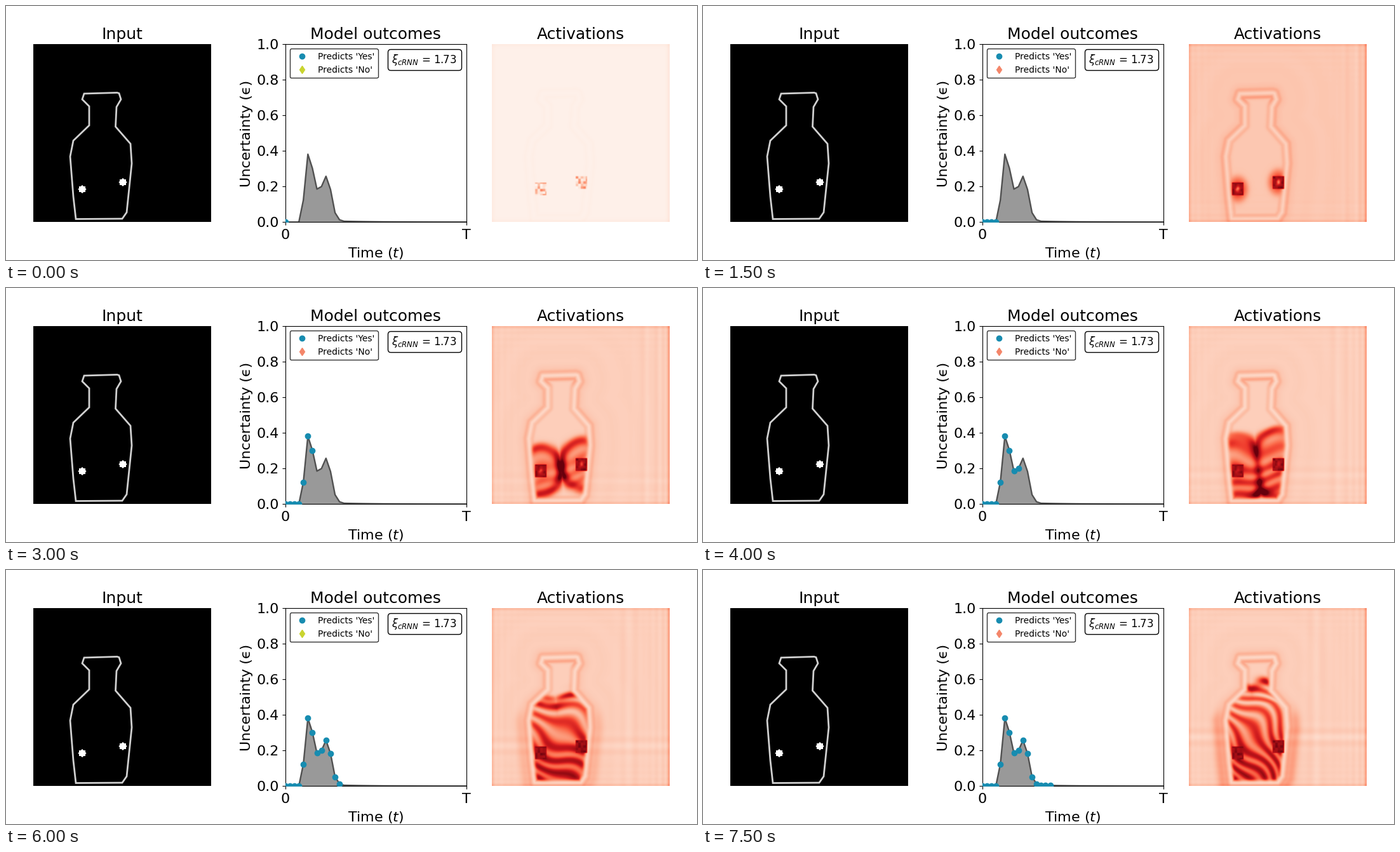
Animation of 1088 by 400 pixels, one loop 8 s. Source, as a matplotlib script:

```python
import numpy as np
import matplotlib.pyplot as plt
from matplotlib.animation import FuncAnimation
from matplotlib.lines import Line2D
from matplotlib.patches import FancyBboxPatch, Polygon
from matplotlib.path import Path

W, H, DPI = 1088, 400, 100
FRAMES, INTERVAL = 16, 500
SIDE = 280
SPEED = 7.2  # pixels the filling front moves per step
TEAL, LIME, SALMON = "#178cb0", "#c9d42f", "#f4866a"
plt.rcParams["font.family"] = "DejaVu Sans"

# Panel coordinates: pixels from the top left corner of each image.
BOTTLE = np.array([
    (80, 78), (132, 76.5), (135, 77.5), (138, 87), (131, 99), (129.5, 130),
    (153, 157), (155, 188), (147, 265), (140, 275), (67, 275.5), (63, 240),
    (58, 177), (63, 152), (88, 128), (88, 98), (77, 87)])
SPOTS = [(77, 228.5), (141, 217.5)]

PEAKS = [.124, .382, .303, .186, .2, .258, .184, .053, .013]
UNCERTAINTY = np.concatenate([np.zeros(4), PEAKS,
                              .005 * np.exp(-np.arange(28) / 8)])

N = SIDE // 2
axis = (np.arange(N) + .5) * 2
X, Y = np.meshgrid(axis, axis)


def gauss(d, s):
    return np.exp(-(d / s) ** 2)


def soft(d):
    return 1 / (1 + np.exp(-np.clip(d, -40, 40)))


def segment_dist(x0, y0, x1, y1):
    dx, dy = x1 - x0, y1 - y0
    t = np.clip(((X - x0) * dx + (Y - y0) * dy) / (dx * dx + dy * dy), 0, 1)
    return np.hypot(X - x0 - t * dx, Y - y0 - t * dy)


def signed_dist():
    ends = zip(BOTTLE, np.roll(BOTTLE, -1, axis=0))
    d = np.min([segment_dist(*a, *b) for a, b in ends], axis=0)
    pts = np.column_stack([X.ravel(), Y.ravel()])
    inside = Path(BOTTLE).contains_points(pts).reshape(X.shape)
    return np.where(inside, d, -d)


WALL = signed_dist()  # positive inside the bottle
OUTSIDE = soft(-WALL / 3)
LIP = gauss(WALL - 7, 3) * soft((92 - Y) / 2)
DEPTH = np.clip((Y - 150) / 125, 0, 1)
RADII = [np.hypot((X - x) * 1.2, (Y - y) * .95) for x, y in SPOTS]
REACH = np.minimum(*RADII)
SEAM = gauss(RADII[0] - RADII[1], 15)
BOXES = np.max([(abs(X - x) < 10) & (abs(Y - y) < 10) for x, y in SPOTS],
               axis=0).astype(float)
GRAIN = np.kron(np.random.default_rng(4).random((N // 2, N // 2)),
                np.ones((2, 2)))


def streak(d, amount):
    return -amount * np.cos(2 * np.pi * d / 21) * gauss(d, 18)


def liquid(k, ramp):
    """Level inside the bottle: halo, dark front, seam, then waves."""
    late = ramp(6, 15)
    waves = ramp(4, 10)
    slant = -.25 + .75 * late
    bend = 5 * np.sin(X / 13 + k / 3) + 6 * np.sin(Y / 15 + X / 40)
    crest = np.cos(2 * np.pi * (Y - slant * X * (1 + DEPTH) + bend)
                   / (28 - 10 * late))
    front = gauss(SPEED * k - REACH - 8, 8)
    return (.3 + .1 * waves
            + (.45 - .3 * ramp(3, 6)) * gauss(REACH, 15)
            + .3 * ramp(3, 6) * front
            + .5 * ramp(3, 6) * (1 - ramp(6, 11)) * SEAM
            + waves * (.2 * crest + .35 * DEPTH))


def activation(k):
    def ramp(start, end):
        return np.clip((k - start) / (end - start), 0, 1)

    early, late = ramp(0, 1), ramp(1, 3)
    v = np.full((N, N), .03 + .1 * early + .08 * late - .025 * ramp(3, 6))

    # Bottle outline and the ripples around it
    v += (.2 + .8 * early) * .06 * gauss(abs(WALL) - 6, 2.6)
    v -= late * .06 * gauss(WALL, 2.2)
    v += late * (.08 * LIP + .04 * OUTSIDE * gauss(WALL, 18))
    v += late * .012 * OUTSIDE * np.cos(WALL / 6) * np.exp(-abs(WALL) / 60)
    v += .14 * ramp(9, 15) * OUTSIDE * gauss(WALL + 14, 8) * soft((Y - 165) / 6)

    # Border, and streaks moving in from it
    for edge, amount in ((SIDE - X, .15), (X, .07), (Y, .07), (SIDE - Y, .06)):
        v += (.4 + .6 * early) * amount * gauss(edge, 4)
        v += late * .22 * amount * np.cos(edge * .6) * np.exp(-edge / 18)
    v += OUTSIDE * streak(Y - 272 + 4.6 * k, .028 * ramp(1, 15))
    v += OUTSIDE * streak(X - 276 + 5 * k, .016 * late)

    fill = soft((SPEED * k - REACH) / 2.5) * soft((WALL - 4.5) / 1.2) * early
    v += fill * (liquid(k, ramp) - v)

    # Spots
    rough = .42 - .3 * late
    core = gauss(REACH, 4) * .5 * early * (1 - ramp(4, 10))
    box = .42 + .55 * early - rough * GRAIN - core
    return v + BOXES * (box - v)


fig = plt.figure(figsize=(W / DPI, H / DPI), dpi=DPI, facecolor="white")


def panel(x, w, title, bottom=340):
    ax = fig.add_axes([x / W, (H - bottom) / H, w / W, SIDE / H])
    ax.set_title(title, fontsize=18)
    return ax


def draw_input():
    ax = panel(43, SIDE, "Input")
    ax.set(xlim=(0, SIDE), ylim=(SIDE, 0))
    ax.axis("off")
    ax.add_patch(plt.Rectangle((0, 0), SIDE, SIDE, fc="black", lw=0))
    ax.add_patch(Polygon(BOTTLE, fill=False, ec="#d0d0d0", lw=2))
    for x, y in SPOTS:
        for turn in (0, np.pi / 4):
            a = turn + np.arange(4) * np.pi / 2
            pts = np.column_stack([x + 6.6 * np.cos(a), y + 6.6 * np.sin(a)])
            ax.add_patch(Polygon(pts, fc="white", lw=0))


def draw_outcomes():
    ax = panel(439.7, 285, "Model outcomes", bottom=340.4)
    ax.set(xlim=(0, 40), ylim=(0, 1))
    ax.set_xticks([0, 40], ["0", "T"])
    ax.tick_params(labelsize=16)
    ax.tick_params(axis="x", pad=4.3)
    ax.set_xlabel("Time ($t$)", fontsize=16, labelpad=5)
    ax.set_ylabel("Uncertainty (\u03f5)", fontsize=16)
    steps = np.arange(len(UNCERTAINTY))
    ax.fill_between(steps, UNCERTAINTY, color="#999999", lw=0)
    ax.plot(steps, UNCERTAINTY, color="#505050", lw=1.7)
    dots = ax.scatter([], [], s=36, lw=1, color=TEAL, zorder=3)
    keys = [Line2D([], [], ls="", marker=m, ms=6, color=TEAL) for m in "od"]
    legend = ax.legend(keys, ["Predicts 'Yes'", "Predicts 'No'"],
                       loc="upper left", fontsize=10, edgecolor="black")
    ax.add_patch(FancyBboxPatch(
        (601.5, H - 101.5), 116, 33, transform=None, fc="white", ec="black",
        lw=1, boxstyle="round,pad=0,rounding_size=4.5", zorder=4))
    ax.text(710, H - 89.5, r"$\xi_{cRNN}$ = 1.73", transform=None,
            fontsize=12, ha="right", va="baseline", zorder=5)
    return dots, legend.legend_handles[1]


def draw_activations():
    ax = panel(765, SIDE, "Activations")
    ax.axis("off")
    return ax.imshow(activation(0), cmap="Reds", vmin=0, vmax=1,
                     interpolation="bilinear", aspect="auto")


draw_input()
dots, no_key = draw_outcomes()
heat = draw_activations()


def update(k):
    shown = np.arange(k + 1)
    dots.set_offsets(np.column_stack([shown, UNCERTAINTY[shown]]))
    no_key.set_color(SALMON if k % 12 else LIME)
    heat.set_data(activation(k))
    return dots, no_key, heat


anim = FuncAnimation(fig, update, frames=FRAMES, interval=INTERVAL,
                     init_func=lambda: update(0), repeat=True, repeat_delay=0)
plt.show()
```
